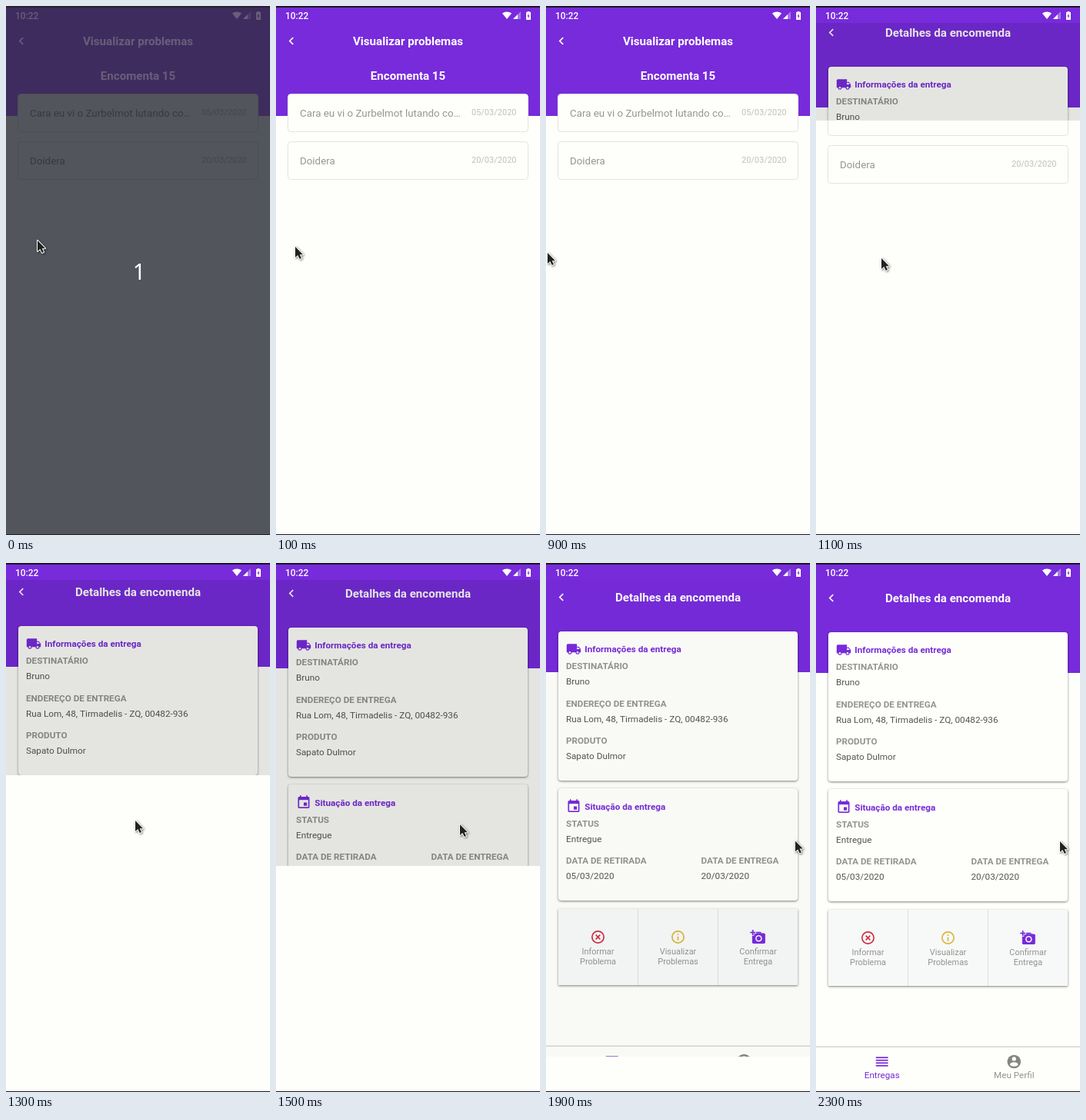
Animation of 343x688 px, one loop 2800 ms. Source, as an HTML page with a canvas:

```html
<!DOCTYPE html>
<html lang="pt-BR">
<head>
<meta charset="utf-8">
<title>Detalhes da encomenda</title>
<style>
  html, body { margin: 0; width: 100%; height: 100%; overflow: hidden; background: #fefffa; }
  canvas { display: block; width: 343px; height: 688px; }
</style>
</head>
<body>
<canvas id="stage" width="343" height="688"></canvas>
<script>
const W = 343, H = 688, LOOP = 2800, STEP = 100;
const STATUS_H = 22, SCREEN_H = 664;
const BACK_AT = 900, SETTLE_AT = 1700, DONE_AT = 2300;
const PURPLE = '#772bdb', PAPER = '#fefffa', GREY = '#93948f', INK = '#555652';
const ctx = document.getElementById('stage').getContext('2d');

const dayTheme = {
  bg: PAPER, head: PURPLE, title: '#fff', border: '#e3e4df',
  text: '#969792', date: '#bfc0bb', edge: '#1c1724'
};
const dimTheme = {
  bg: '#52555c', head: '#3f2c5e', title: '#695e7a', border: '#4b4e54',
  text: '#373a3e', date: '#43464a', edge: '#25232c'
};

const mix = (a, b, u) => a + (b - a) * u;
const easeOut = u => 1 - (1 - u) ** 3;

function rect(x, y, w, h, color) {
  ctx.fillStyle = color;
  ctx.fillRect(x, y, w, h);
}

function roundRect(x, y, w, h, r, color) {
  ctx.beginPath();
  ctx.roundRect(x, y, w, h, r);
  ctx.fillStyle = color;
  ctx.fill();
}

function disc(x, y, rx, color, ry = rx) {
  ctx.beginPath();
  ctx.ellipse(x, y, rx, ry, 0, 0, Math.PI * 2);
  ctx.fillStyle = color;
  ctx.fill();
}

function polygon(color, ...points) {
  ctx.beginPath();
  points.forEach(([x, y]) => ctx.lineTo(x, y));
  ctx.fillStyle = color;
  ctx.fill();
}

function line(color, ...points) {
  ctx.beginPath();
  points.forEach(([x, y]) => ctx.lineTo(x, y));
  ctx.strokeStyle = color;
  ctx.lineWidth = 2;
  ctx.stroke();
}

function ring(color) {
  ctx.beginPath();
  ctx.arc(12, 12, 9, 0, Math.PI * 2);
  ctx.strokeStyle = color;
  ctx.lineWidth = 2;
  ctx.stroke();
}

// Icons on a 24 unit grid
const icons = {
  back(ink) {
    line(ink, [14.7, 6.7], [9.4, 12], [14.7, 17.3]);
  },
  truck(ink, hole) {
    roundRect(1, 4, 16, 13, [2, 0, 0, 0], ink);
    polygon(ink, [17, 8], [20, 8], [23, 12], [23, 17], [17, 17]);
    polygon(hole, [17, 9.5], [19.5, 9.5], [21.5, 12], [17, 12]);
    for (const x of [6, 18]) {
      disc(x, 17, 3, ink);
      disc(x, 17, 1.5, hole);
    }
  },
  calendar(ink, hole) {
    for (const x of [6, 16]) rect(x, 1, 2, 3, ink);
    roundRect(3, 3, 18, 18, 2, ink);
    rect(5, 8, 14, 11, hole);
    rect(12, 12, 5, 5, ink);
  },
  camera(ink, hole) {
    roundRect(3, 6, 20, 16, 2, ink);
    polygon(ink, [9, 6], [9, 4], [16, 4], [18, 6]);
    rect(2, 5, 4, 5, hole);
    rect(6, 5, 3, 2, hole);
    rect(3, 1, 2, 8, ink);
    rect(0, 4, 8, 2, ink);
    disc(13, 14, 5, hole);
    disc(13, 14, 3.2, ink);
  },
  lines(ink) {
    for (let y = 5; y < 20; y += 4) rect(3, y, 18, 2, ink);
  },
  user(ink, hole) {
    disc(12, 12, 10, ink);
    disc(12, 8, 3, hole);
    disc(12, 16, 6, hole, 3.1);
  },
  cross(ink) {
    ring(ink);
    line(ink, [8.7, 8.7], [15.3, 15.3]);
    line(ink, [15.3, 8.7], [8.7, 15.3]);
  },
  info(ink) {
    ring(ink);
    rect(11, 7, 2, 2, ink);
    rect(11, 11, 2, 6, ink);
  }
};

function icon(name, cx, cy, color, scale = 0.835, hole = PAPER) {
  ctx.save();
  ctx.translate(cx, cy);
  ctx.scale(scale, scale);
  ctx.translate(-12, -12);
  icons[name](color, hole);
  ctx.restore();
}

function text(str, x, y, size, color, { weight = 400, align = 'left', font = 'Roboto' } = {}) {
  ctx.font = `${weight} ${size}px "${font}", sans-serif`;
  ctx.textAlign = align;
  ctx.fillStyle = color;
  ctx.fillText(str, x, y);
}

function title(str, y, theme) {
  text(str, 171.5, y, 15.1, theme.title, { weight: 700, align: 'center' });
}

function header(str, theme) {
  rect(0, 0, W, 143, theme.head);
  icon('back', 20, 45.5, theme.title);
  title(str, 51, theme);
}

function raisedCard(y, h, fill, radius) {
  ctx.save();
  ctx.shadowColor = 'rgba(0,0,0,.5)';
  ctx.shadowBlur = 3;
  ctx.shadowOffsetY = 1;
  roundRect(16, y, 311, h, radius, fill);
  ctx.restore();
}

function problemRow(y, label, date, theme) {
  roundRect(15.5, y, 312, 49, 4, theme.bg);
  ctx.strokeStyle = theme.border;
  ctx.lineWidth = 1;
  ctx.stroke();
  text(label, 31, y + 29.5, 13.35, theme.text);
  text(date, 312.5, y + 27.5, 11, theme.date, { align: 'right' });
}

function problemsScreen(theme) {
  rect(0, 0, W, H, theme.bg);
  header('Visualizar problemas', theme);
  title('Encomenta 15', 96, theme);
  problemRow(114.5, 'Cara eu vi o Zurbelmot lutando co…', '05/03/2020', theme);
  problemRow(176.5, 'Doidera', '20/03/2020', theme);
}

function field(label, value, x, y) {
  text(label, x, y, 11.7, GREY, { weight: 700 });
  text(value, x, y + 20, 11.75, INK);
}

function section(name, label, y) {
  icon(name, 36, y, PURPLE);
  text(label, 50.3, y + 4, 11.7, PURPLE, { weight: 700 });
}

function action(name, color, cx, lines) {
  icon(name, cx, 487.5, color, 0.85, '#f7f8f8');
  lines.forEach((str, i) => text(str, cx, 510 + i * 13, 10.95, GREY, { align: 'center' }));
}

function tab(name, label, cx, iconColor, color) {
  icon(name, cx, 648.5, iconColor, 0.88);
  text(label, cx, 670, 11.7, color, { align: 'center' });
}

function detailScreen() {
  rect(0, 0, W, H + 20, PAPER);
  header('Detalhes da encomenda', dayTheme);

  raisedCard(90, 194, PAPER, 4);
  section('truck', 'Informações da entrega', 113);
  field('DESTINATÁRIO', 'Bruno', 26, 139);
  field('ENDEREÇO DE ENTREGA', 'Rua Lom, 48, Tirmadelis - ZQ, 00482-936', 26, 187.5);
  field('PRODUTO', 'Sapato Dulmor', 26, 236);

  raisedCard(294, 146, PAPER, 4);
  section('calendar', 'Situação da entrega', 317.5);
  field('STATUS', 'Entregue', 26, 344);
  field('DATA DE RETIRADA', '05/03/2020', 26, 392);
  field('DATA DE ENTREGA', '20/03/2020', 201.5, 392);

  raisedCard(451, 99, '#f7f8f8', 1);
  for (const x of [119, 223]) rect(x, 451, 1, 99, '#dedfde');
  action('cross', '#cf3145', 67.5, ['Informar', 'Problema']);
  action('info', '#dab83c', 171.5, ['Visualizar', 'Problemas']);
  action('camera', PURPLE, 275.5, ['Confirmar', 'Entrega']);

  rect(0, 628, W, 1, '#ebece8');
  rect(0, 629, W, 1, '#d3d4d0');
  tab('lines', 'Entregas', 85.7, PURPLE, PURPLE);
  tab('user', 'Meu Perfil', 257.3, '#858681', GREY);
}

function statusBar(theme) {
  rect(0, 0, W, STATUS_H, theme.head);
  rect(0, 0, W, 2, theme.edge);
  text('10:22', 12, 17, 11.9, theme.title, { weight: 500 });

  ctx.beginPath();
  ctx.moveTo(300, 17);
  ctx.arc(300, 17, 9.6, -Math.PI * 0.72, -Math.PI * 0.28);
  ctx.fillStyle = theme.title;
  ctx.fill();

  ctx.globalAlpha = 0.35;
  polygon(theme.title, [308, 17], [318, 7], [318, 17]);
  ctx.globalAlpha = 1;
  polygon(theme.title, [308, 17], [314, 11], [314, 17]);

  rect(326.5, 7, 3, 2, theme.title);
  rect(325, 8, 6, 10, theme.title);
  polygon(theme.head, [328.6, 9.5], [326.3, 13.6], [327.8, 13.6], [327.4, 16.5], [329.7, 12.4], [328.3, 12.4]);
}

// Pointer stops: time, x, y
const pointerStops = [
  [0, 41, 305], [100, 25, 313], [600, 2, 321], [BACK_AT, 2, 321],
  [1300, 168, 335], [1500, 239, 340], [SETTLE_AT, 340, 360], [DONE_AT, 317, 362]
];
// Share of the closing screen already uncovered: time, share
const closeStops = [[BACK_AT, 0], [1300, 0.3825], [1500, 0.56], [SETTLE_AT, 0.774], [DONE_AT, 1]];

function follow(stops, t) {
  const next = stops.findIndex(stop => stop[0] > t);
  if (next < 0) return stops.at(-1).slice(1);
  const from = stops[next - 1], to = stops[next];
  let u = (t - from[0]) / (to[0] - from[0]);
  if (to[0] === DONE_AT) u = easeOut(u);
  return from.slice(1).map((a, i) => mix(a, to[i + 1], u));
}

function cursor([x, y]) {
  ctx.save();
  ctx.translate(x, y);
  ctx.lineJoin = 'round';
  ctx.shadowColor = 'rgba(0,0,0,.4)';
  ctx.shadowBlur = 3;
  ctx.shadowOffsetX = ctx.shadowOffsetY = 1;
  polygon('#222', [0, 0], [0, 14], [3.3, 11], [5.8, 16], [8, 15], [5.7, 10.2], [10, 10.2]);
  ctx.closePath();
  ctx.strokeStyle = '#fff';
  ctx.lineWidth = 2;
  ctx.stroke();
  ctx.shadowColor = 'transparent';
  ctx.fill();
  ctx.restore();
}

function transition(closed) {
  const open = 1 - closed;
  ctx.save();
  ctx.translate(0, -Math.round(0.02 * SCREEN_H * open));
  detailScreen();
  ctx.restore();
  rect(0, 0, W, H, `rgba(0,0,0,${Math.min(0.1, open / 3.6)})`);

  ctx.save();
  ctx.beginPath();
  ctx.rect(0, Math.round(STATUS_H + SCREEN_H * closed), W, H);
  ctx.clip();
  ctx.translate(0, Math.round(0.041 * SCREEN_H * closed));
  problemsScreen(dayTheme);
  ctx.restore();
}

function draw(time) {
  const t = Math.floor(time % LOOP / STEP) * STEP;
  const counting = t < STEP;
  const theme = counting ? dimTheme : dayTheme;
  if (t <= BACK_AT) problemsScreen(theme);
  else if (t < DONE_AT) transition(follow(closeStops, t)[0]);
  else detailScreen();
  statusBar(theme);
  rect(0, H - 1, W, 1, theme.edge);
  if (counting) text('1', 173, 355.5, 29, '#fff', { align: 'center', font: 'Noto Sans' });
  cursor(follow(pointerStops, t));
}

let start;
function tick(now) {
  start ??= now;
  draw(now - start);
  requestAnimationFrame(tick);
}
draw(0);
requestAnimationFrame(tick);
</script>
</body>
</html>
```
